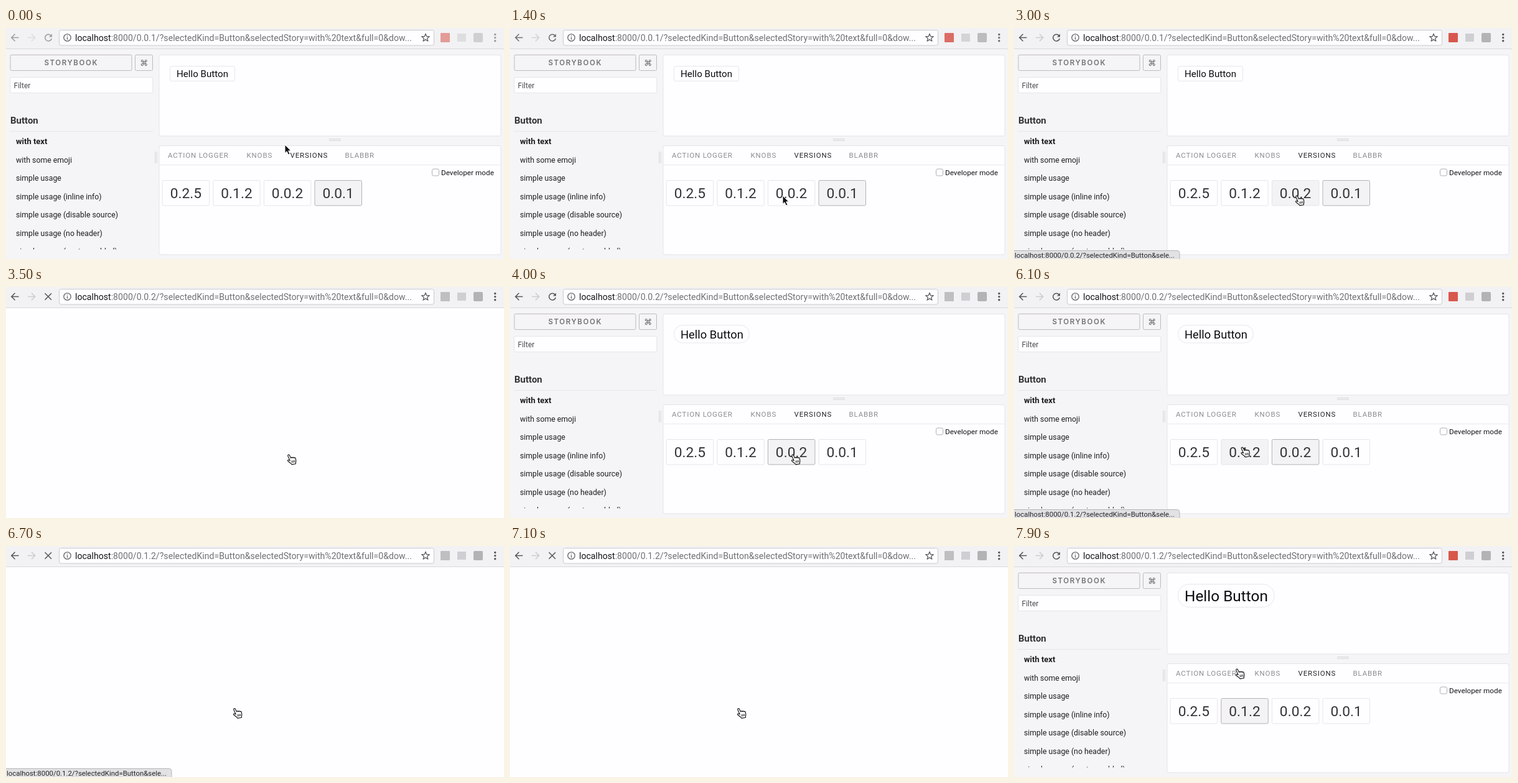
An HTML page for the animation above (8000 ms loop, 800x372 px).

```html
<!DOCTYPE html>
<html lang="en">
<head>
<meta charset="utf-8">
<title>Version switcher</title>
<style>
  html, body { margin: 0; width: 100%; height: 100%; overflow: hidden; background: #f5f4f6; }
  svg { display: block; width: 100vw; height: 100vh; }
  text { font-family: Roboto, Inter, sans-serif; white-space: pre; }
</style>
</head>
<body>
<svg id="stage" viewBox="0 0 800 372" xmlns="http://www.w3.org/2000/svg">
  <defs>
    <clipPath id="listClip"><rect y="34" width="245" height="322.5"/></clipPath>
  </defs>
  <rect id="back" width="800" height="372"/>

  <g id="page">
    <g id="sidebar" clip-path="url(#listClip)"></g>
    <g id="panels"></g>
    <g id="hello"><rect x="263.5" y="61.5" fill="#fefdff" stroke="#e7e6e9"/><text x="274" fill="#0c0c0d">Hello Button</text></g>
    <g id="versions"></g>
  </g>

  <g id="toolbar">
    <rect width="800" height="33" fill="#f2f1f3"/>
    <path d="M0 33.5H800" stroke="#d9d8db"/>
    <rect x="85.5" y="3.5" width="602" height="24.5" rx="3" fill="#fefdff" stroke="#cbcace"/>
    <g fill="none" stroke-width="1.3" stroke="#626164">
      <circle cx="98.5" cy="15.5" r="5.7"/>
      <path d="M98.5 14.7V18.7M98.5 12.2V13.5"/>
      <path id="star" stroke-linejoin="round"/>
    </g>
    <text x="111" y="20.5" font-size="14.12" fill="#717073"><tspan fill="#161618">localhost</tspan><tspan id="url"></tspan></text>
    <g id="icons">
      <g fill="none" stroke="#59585b" stroke-width="1.6">
        <path d="M20.5 15.5H9M14.5 9.8L8.8 15.5L14.5 21.2"/>
        <path d="M35 15.5H46.5M41 9.8L46.7 15.5L41 21.2" stroke="#cdccd0"/>
        <g id="reload">
          <path d="M72.3 12.2A5.4 5.4 0 1 0 73.3 17"/>
          <path d="M74 9.5V14.5H69Z" fill="#59585b" stroke="none"/>
        </g>
        <path id="stop" d="M62.5 10.3L73 20.8M73 10.3L62.5 20.8"/>
      </g>
      <rect id="ext" x="698" y="8" width="15" height="15" rx="1"/>
      <rect x="725" y="9" width="14" height="13" fill="#cfced2"/>
      <rect x="751" y="8" width="15" height="15" rx="2" fill="#b3b2b5"/>
      <g fill="#59585b">
        <circle cx="785.7" cy="10.5" r="1.7"/><circle cx="785.7" cy="15.6" r="1.7"/><circle cx="785.7" cy="20.7" r="1.7"/>
      </g>
    </g>
  </g>

  <g id="status">
    <path d="M-1 373V358.5H262Q266 358.5 266 362.5V373Z" fill="#e2e1e4" stroke="#b5b4b8"/>
    <text x="1" y="370" font-size="11.4" fill="#262628"></text>
  </g>

  <path id="arrow" d="M0 0V13.5L3.1 10.7L5.5 16L8 14.9L5.7 9.8H9.8Z" fill="#111" stroke="#fff" stroke-linejoin="round"/>
  <g id="hand">
    <g transform="translate(-1.2 .3) rotate(-10)" stroke="#151515" stroke-width="1.15" stroke-linejoin="round" stroke-linecap="round">
      <path fill="#fff" d="M-1.3 1.5C-1.6 -.4 .8 -.8 1.4 1L2.9 5.8C3.1 4.6 5.2 4.5 5.6 6C6.1 4.9 7.8 5.1 8.1 6.6C8.8 5.7 10.2 6.3 10.3 7.7L10.2 11.2C10 13 9.2 13.7 8.9 16.2H2.5C1.9 14.2 -.4 12.5 -2.3 10.2C-3.6 8.7 -2.4 7.6 -1 8.3L.7 9.5Z"/>
      <path fill="none" stroke-width=".9" d="M3.5 10.5V13.3M5.6 10.5V13.3M7.7 10.5V13.3"/>
    </g>
  </g>
</svg>
<script>
const NS = 'http://www.w3.org/2000/svg';
const LOOP = 8000, STEP = 100;
const $ = id => document.getElementById(id);

function set(el, attrs) {
  for (const key in attrs) el.setAttribute(key, attrs[key]);
}
function add(parent, tag, attrs, content) {
  const el = document.createElementNS(NS, tag);
  set(el, attrs);
  if (content) el.textContent = content;
  parent.appendChild(el);
  return el;
}
function show(id, on) {
  $(id).style.display = on ? '' : 'none';
}
function box(parent, x, y, width, height, fill, stroke, rx = 2) {
  return add(parent, 'rect', { x, y, width, height, rx, fill, stroke });
}
function label(parent, x, y, size, fill, content, extra = {}) {
  return add(parent, 'text', { x, y, 'font-size': size, fill, ...extra }, content);
}

function buildSidebar() {
  const g = $('sidebar');
  box(g, 7, 43.3, 195, 25.2, '#f5f4f6', '#bcbbbe');
  label(g, 61.5, 60.1, 11.5, '#737275', 'STORYBOOK',
    { 'font-weight': 600, 'letter-spacing': 1.6, style: 'font-family:Inter,sans-serif' });
  box(g, 207.5, 43.3, 28, 25.2, '#f5f4f6', '#bcbbbe');
  label(g, 221.5, 60.5, 13, '#626164', '⌘', { 'text-anchor': 'middle', style: 'font-family:"DejaVu Sans",sans-serif' });
  box(g, 6.8, 79.3, 229, 25.2, '#fefdff', '#e5e4e7');
  label(g, 12.5, 96.5, 12, '#4c4b4e', 'Filter');
  label(g, 7, 153.5, 15, '#333235', 'Button', { 'font-weight': 700 });
  add(g, 'path', { d: 'M7 166.5H236', stroke: '#e6e5e8' });
  ['with text', 'with some emoji', 'simple usage', 'simple usage (inline info)',
    'simple usage (disable source)', 'simple usage (no header)', 'simple usage (custom added)'
  ].forEach((story, i) => label(g, 16, 187 + i * 29.55, i ? 12.3 : 13, '#1f1e21', story, { 'font-weight': i ? 400 : 700 }));
}

function buildPanels() {
  const g = $('panels');
  box(g, 246, 43.5, 549, 130.5, '#fefdff', '#e4e3e6', 3);
  box(g, 246, 189.5, 549, 175.5, '#fefdff', '#e4e3e6', 3);
  add(g, 'path', { d: 'M246 220.5H794', stroke: '#e9e8eb' });
  add(g, 'path', { d: 'M519 178.8H538M519 181.2H538M239.8 199V218M242.2 199V218', stroke: '#d6d5d8' });
  [['ACTION LOGGER', 260], ['KNOBS', 386.5], ['VERSIONS', 456.5], ['BLABBR', 544.5]].forEach(([name, x]) =>
    label(g, x, 209.3, 11.5, name === 'VERSIONS' ? '#232325' : '#8c8b8e', name, { 'letter-spacing': .85 }));
  box(g, 684.5, 227, 11, 11, '#fefdff', '#b0afb2', 2.5);
  label(g, 699, 236.5, 11.75, '#161618', 'Developer mode');
}

const VERSIONS = ['0.2.5', '0.1.2', '0.0.2', '0.0.1'];
let buttons;
function buildVersions() {
  buttons = VERSIONS.map((version, i) => {
    const x = 251.2 + i * 81.6;
    const rect = box($('versions'), x, 245.5, 75.5, 40.5);
    label($('versions'), x + 37.7, 274, 22.8, '#333235', version, { 'text-anchor': 'middle' });
    return rect;
  });
}

function buildStar() {
  const points = Array.from({ length: 10 }, (_, i) => {
    const r = i % 2 ? 2.8 : 6.6, a = (i / 5 - .5) * Math.PI;
    return (674 + r * Math.cos(a)).toFixed(2) + ' ' + (15.8 + r * Math.sin(a)).toFixed(2);
  });
  set($('star'), { d: 'M' + points.join('L') + 'Z' });
}

// Pointer tip: time, x, y
const PATH = [
  [0, 448, 188], [500, 439, 271], [700, 439, 271], [1100, 438, 270], [1600, 438, 270],
  [2100, 455, 270], [4300, 455, 270], [4800, 440, 226], [5700, 385, 236],
  [6100, 367.5, 258], [6300, 368, 261.5], [7700, 368, 261.5], [7900, 359, 198]
];
function pointer(t) {
  const i = PATH.findIndex(key => key[0] > t);
  if (i < 0) return PATH[PATH.length - 1].slice(1);
  const [t0, x0, y0] = PATH[i - 1], [t1, x1, y1] = PATH[i];
  const k = (t - t0) / (t1 - t0), e = k * k * (3 - 2 * k);
  return [x0 + (x1 - x0) * e, y0 + (y1 - y0) * e];
}

// Preview button per version: width, height, radius, font size, baseline
const HELLO = {
  '0.0.1': [104, 24, 2.5, 15.15, 79.3],
  '0.0.2': [121, 28.5, 14, 18.4, 82.6],
  '0.1.2': [154.5, 37, 18, 24.4, 89]
};
const LOADS = [
  { start: 3100, page: 3600, hello: 3800, done: 4000, icon: 4400 },
  { start: 6700, page: 7300, hello: 7400, done: 7500, icon: 7500 }
];
const HOVERS = [
  { from: 1800, to: 3400, index: 2 },
  { from: 5800, to: 6900, index: 1 }
];

function render(t) {
  const within = (a, b) => t >= a && t < b;
  const pending = stage => LOADS.some(load => within(load.start, load[stage]));
  const selected = 3 - LOADS.filter(load => t >= load.start).length;
  const version = VERSIONS[selected];
  const hover = HOVERS.find(h => within(h.from, h.to));

  set($('back'), { fill: pending('page') ? '#fefdff' : '#f5f4f6' });
  show('page', !pending('page'));
  show('hello', !pending('hello'));
  show('stop', pending('done'));
  show('reload', !pending('done'));
  set($('ext'), { fill: pending('icon') ? '#bfbec1' : '#d8574d' });
  $('url').textContent = `:8000/${version}/?selectedKind=Button&selectedStory=with%20text&full=0&dow...`;

  // The toolbar stays dimmed until the window gets focus
  const focus = Math.min(1, Math.max(0, (t - 1200) / 300));
  set($('icons'), { opacity: .55 + .45 * focus });

  const [width, height, rx, size, y] = HELLO[version];
  set($('hello').firstChild, { width, height, rx });
  set($('hello').lastChild, { 'font-size': size, y });

  buttons.forEach((rect, i) => {
    const on = i === selected, over = hover && hover.index === i;
    set(rect, { fill: on || over ? '#f3f2f4' : '#fefdff', stroke: on ? '#b3b2b5' : '#e6e5e8' });
  });

  show('status', hover);
  if (hover) $('status').lastElementChild.textContent =
    `localhost:8000/${VERSIONS[hover.index]}/?selectedKind=Button&sele...`;

  const [px, py] = pointer(t);
  const hand = within(1800, 4500) || t >= 5800;
  show('hand', hand);
  show('arrow', !hand);
  set($(hand ? 'hand' : 'arrow'), { transform: `translate(${px} ${py})` });
}

buildSidebar();
buildPanels();
buildVersions();
buildStar();

const begin = performance.now();
function tick() {
  const t = (performance.now() - begin) % LOOP;
  render(Math.floor(t / STEP) * STEP);
  requestAnimationFrame(tick);
}
tick();
</script>
</body>
</html>
```
